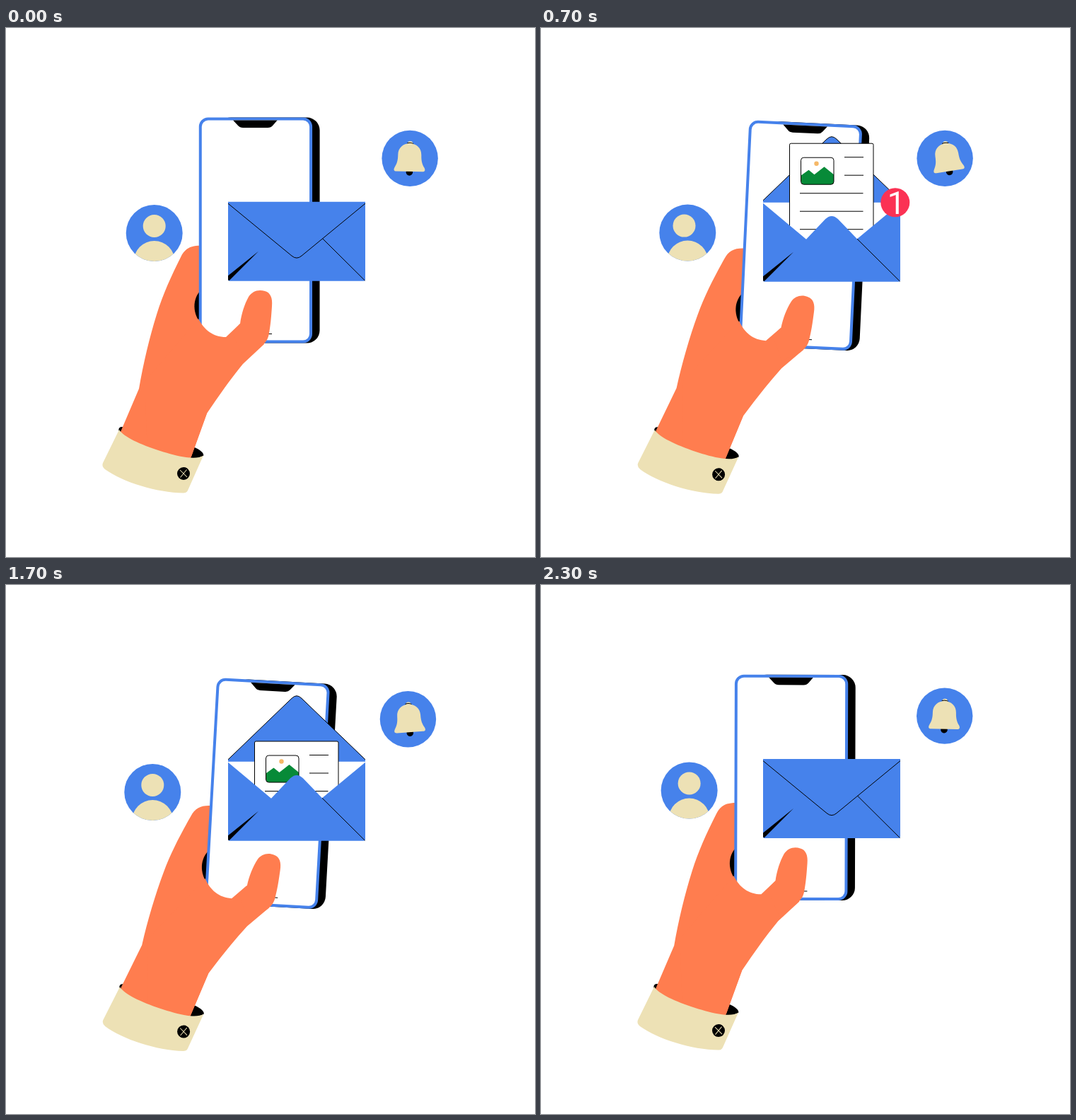
An HTML page that plays this animation: 748x748 px, repeating every 2400 ms.

```html
<!DOCTYPE html>
<html lang="en">
<head>
<meta charset="utf-8">
<title>New message</title>
<style>
  html, body { margin: 0; width: 100%; height: 100%; overflow: hidden; background: #fff; }
  svg { display: block; width: 100%; height: 100%; }
  .blue { fill: #4682eb; }
  .skin { fill: #ff7d4f; }
  .sand { fill: #ede1b5; }
  .white { fill: #fff; }
  .line { fill: none; stroke: #000; stroke-width: 1; vector-effect: non-scaling-stroke; }
  .one { font: 400 45px Roboto, Arial, sans-serif; fill: #fff; }
</style>
</head>
<body>
<svg viewBox="0 0 748 748">
  <defs>
    <clipPath id="disc"><circle r="40"/></clipPath>
    <clipPath id="slot"><rect x="300" y="-130" width="220" height="232"/></clipPath>
    <g id="flapShape">
      <path class="blue" d="M314 0V2.500L404 76.500Q411 82.500 418 76.500L508 2.500V0Z"/>
      <path class="line" d="M314 2.500L404 76.500Q411 82.500 418 76.500L508 2.500"/>
    </g>
  </defs>

  <g class="cuff">
    <path d="M159.500 571C158 564 163 562 170 566L262 591C273 595 281 601 279 605L262 612Z"/>
  </g>

  <g id="arm">
    <path class="skin" d="M280 308C262 307 253 311 247 324C234 350 222 376 213 405C203 437 194 475 188 510L162 571L161 577L200 610L256 620L262 606L284 545L300 440Z"/>
    <path d="M276 370C263 383 263 404 277 420Z"/>
    <rect x="300" y="126.500" width="143.500" height="319" rx="18"/>
    <rect x="274.700" y="128.500" width="156.300" height="315" rx="11" class="white" stroke="#4682eb" stroke-width="4"/>
    <path d="M321 130.500H383.500L377 138Q374.500 141 370 141H335Q330.500 141 328 138Z"/>
    <path class="line" d="M360 432.500H376"/>
    <path class="skin" d="M272 411C280 427 293 437 311 437L331 418L365 447L335 475C317 497 300 521 284 545L262 606L200 600L196 500Z"/>
    <path id="thumb" class="skin" d="M331 418C333 404 337 391 343 380C348 372 357 369 366 372C374 374 377 382 376 393C375 409 374 421 371.500 434C370 441 366 446 360 451L335 465L320 430Z"/>
  </g>

  <g class="cuff">
    <path class="sand" d="M160 568C166 578 190 589 218 598C240 605 268 612 279 604.500L257 654Q255.500 657.500 251 657.500C213 657 165 642 140 624Q135 620 137 615Z"/>
    <circle cx="251" cy="630" r="9"/>
    <path d="M246 625L256 635M255.500 624.500L246.500 635.500" stroke="#ede1b5" stroke-width="1"/>
  </g>

  <g id="envelope">
    <path class="white" d="M314 1H508L447 62H375Z"/>
    <use id="flapBack" href="#flapShape"/>
    <g clip-path="url(#slot)">
      <g id="letter">
        <rect x="351.500" y="0" width="118.500" height="165" rx="2" class="white" stroke="#000"/>
        <path fill="#078a38" d="M368 45L378.500 37.500L386.500 44L400.500 33L414 44V54Q414 58 410 58H372Q368 58 368 54Z"/>
        <circle cx="389.500" cy="28.500" r="3.200" fill="#f5b868"/>
        <rect x="367.500" y="20" width="46.500" height="38" rx="4" class="line"/>
        <path class="line" d="M429 19.500H456M429 45H456M366 70.500H455.500M366 96H455.500M366 121.500H455.500"/>
      </g>
    </g>
    <path class="blue" d="M314 1L375 52L402 23.500Q411 15 420 23.500L447 51.500L508 1V110Q508 112 506 112H316Q314 112 314 110Z"/>
    <path d="M357 70L314 104.500V109Q314 112 316 111Z"/>
    <path class="line" d="M447 51.500L507.500 111.500"/>
    <use id="flapFront" href="#flapShape"/>
    <g id="badge">
      <circle r="20.500" fill="#fb3254"/>
      <text class="one" x="-11" y="16">1</text>
    </g>
  </g>

  <g id="person">
    <circle class="blue" r="40"/>
    <circle id="head" class="sand" cy="-10" r="16"/>
    <ellipse class="sand" cy="40" rx="29" ry="29" clip-path="url(#disc)"/>
  </g>

  <g id="alert">
    <circle class="blue" r="39.700"/>
    <g id="bell">
      <circle cx="0.500" cy="-20.500" r="3.800" class="sand"/>
      <circle cy="19.500" r="4.800"/>
      <path d="M-4 -21.500Q0 -23 5 -21" class="line"/>
      <path class="sand" d="M-16.500 -5C-16.500 -15 -9 -21 0 -21S16.500 -15 16.500 -5C16.500 4 18 8 21 13C23 17 21.500 18.500 18.500 18.500H-18.500C-21.500 18.500 -23 17 -21 13C-18 8 -16.500 4 -16.500 -5Z"/>
    </g>
  </g>
</svg>

<script>
const LOOP = 2400, STEP = 100;

const el = id => document.getElementById(id);
const place = (node, transform) => node.setAttribute("transform", transform);
const show = (node, on) => node.setAttribute("display", on ? "inline" : "none");
const cuffs = document.querySelectorAll(".cuff");

// Smooth 0 to 1 between two times
function ease(t, from, to) {
  const u = Math.min(1, Math.max(0, (t - from) / (to - from)));
  return u * u * (3 - 2 * u);
}

// Rises during a..b, falls during c..d
const pulse = (t, a, b, c, d) => ease(t, a, b) - ease(t, c, d);

// One slow swing per loop: 0 at the delay, 1 half a loop later
const wave = (t, delay) => (1 - Math.cos((t - delay) / LOOP * 2 * Math.PI)) / 2;

function drawArm(t) {
  const sway = 4.7 * wave(t, 40);
  place(el("arm"), `rotate(${sway} 205 585)`);
  place(el("thumb"), `rotate(${sway * 0.36} 350 455)`);
  cuffs.forEach(c => place(c, `rotate(${sway * 0.25} 140 640)`));
}

function drawEnvelope(t) {
  place(el("envelope"), `translate(0 ${245.1 + 5.2 * wave(t, 250)})`);

  const rise = 84.5 * pulse(t, 100, 335, 1550, 1800) + 9 * pulse(t, 1200, 1500, 1550, 1700);
  place(el("letter"), `translate(0 ${1 - rise})`);

  const flap = 1 - 2.17 * pulse(t, 0, 200, 1700, 1950);
  for (const id of ["flapBack", "flapFront"]) {
    place(el(id), `scale(1 ${flap})`);
    show(el(id), (id === "flapFront") === (flap > 0));
  }

  const size = pulse(t, 100, 300, 1500, 1700) + 0.06 * pulse(t, 200, 300, 300, 400);
  place(el("badge"), `translate(500.800 0) scale(${size})`);
  show(el("badge"), size > 0.01);
}

function drawIcons(t) {
  place(el("person"), `translate(${209.7 - 3.8 * wave(t, 0)} ${289 + 4 * wave(t, 400)})`);
  place(el("head"), `translate(${-4.8 * pulse(t, 0, 300, 1100, 1450)} 0)`);

  const drift = wave(t, 350);
  place(el("alert"), `translate(${571.8 - 3.5 * drift} ${183 + 7 * drift})`);
  const ring = pulse(t, 0, 300, 700, 1050) + pulse(t, 1550, 1850, 1950, 2250);
  place(el("bell"), `rotate(${1 - 10 * ring} 0 -22)`);
}

const start = performance.now();
function tick() {
  const now = (performance.now() - start) % LOOP;
  const t = Math.floor(now / STEP) * STEP;
  drawArm(t);
  drawEnvelope(t);
  drawIcons(t);
  requestAnimationFrame(tick);
}
tick();
</script>
</body>
</html>
```
